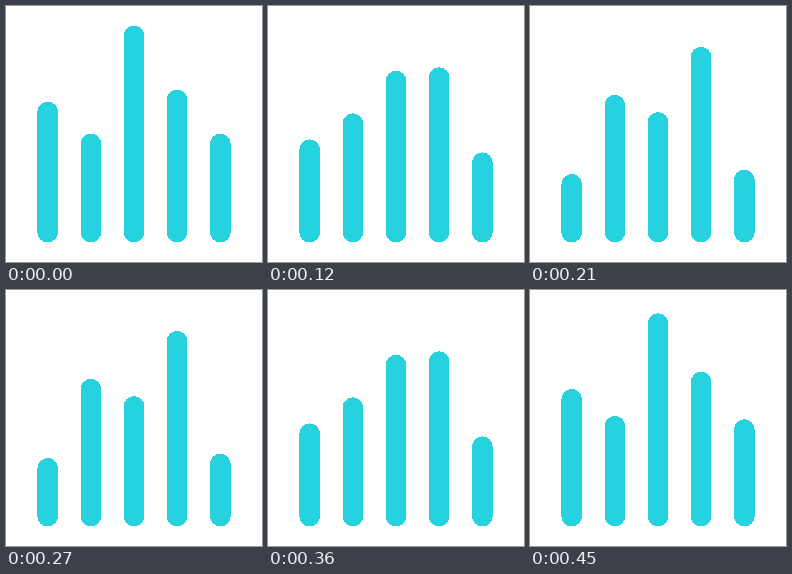
Animation of 256 by 256 pixels, one loop 0.48 s. Source, as an HTML page without scripts:

```html
<!DOCTYPE html>
<html lang="en">
<head>
<meta charset="utf-8">
<title>Equalizer bars</title>
<style>
  @property --step {
    syntax: "<number>";
    inherits: true;
    initial-value: 0;
  }
  html, body {
    margin: 0;
    height: 100%;
    overflow: hidden;
    background: #fff;
  }
  svg {
    display: block;
    width: 100%;
    height: 100%;
    fill: #26d2dd;
    shape-rendering: crispEdges;
    animation: tick 480ms steps(16) infinite;
  }
  @keyframes tick {
    from { --step: 0; }
    to { --step: 16; }
  }
  /* Out and back in 16 steps, eased with smoothstep */
  rect {
    --p: min(var(--step) / 8, 2 - var(--step) / 8);
    --ease: calc(var(--p) * var(--p) * (3 - 2 * var(--p)));
    --y: calc(var(--top) + var(--travel) * var(--ease));
    y: calc(var(--y) * 1px);
    height: calc((236.5 - var(--y)) * 1px);
    width: 20.6px;
    rx: 10.3px;
    ry: 10.3px;
  }
</style>
</head>
<body>
<svg viewBox="0 0 256 256">
  <rect x="31.4" style="--top: 95.7; --travel: 75.5"/>
  <rect x="74.6" style="--top: 127.6; --travel: -40.5"/>
  <rect x="117.7" style="--top: 19.5; --travel: 90.5"/>
  <rect x="160.8" style="--top: 83.5; --travel: -44.5"/>
  <rect x="204" style="--top: 127.6; --travel: 37.7"/>
</svg>
</body>
</html>
```
